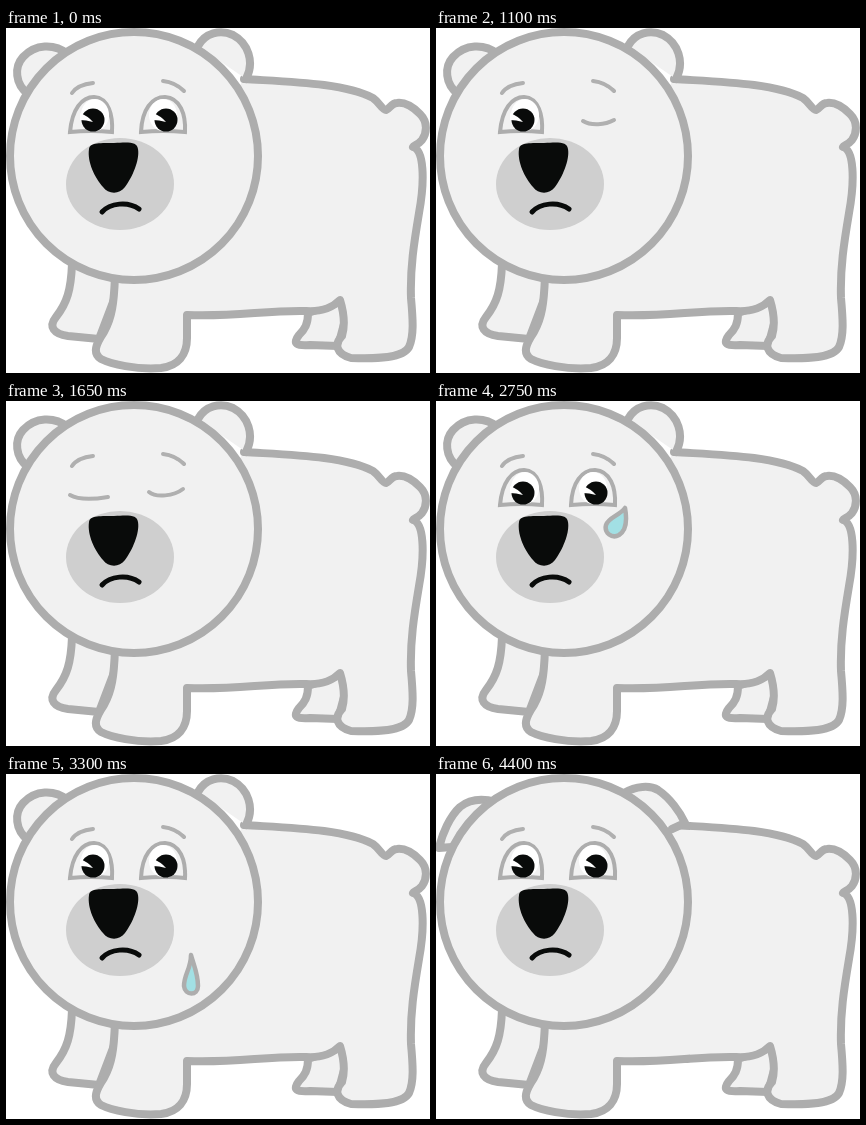
Recreate the animation shown at these times as an HTML page. Size 424 px wide and 345 px high, loop 4.95 s.

```html
<!DOCTYPE html>
<html lang="en">
<head>
<meta charset="utf-8">
<title>Sad polar bear</title>
<style>
  html, body { margin: 0; width: 100%; height: 100%; overflow: hidden; background: #fff; }
  svg { display: block; width: 424px; height: 345px; }
  .fur { fill: #f1f1f1; stroke: #adadad; stroke-width: 8; stroke-linejoin: round; stroke-linecap: round; }
  .line { fill: none; stroke: #b0b0b0; stroke-width: 4; stroke-linecap: round; }
  .lid { fill: #f1f1f1; stroke: #adadad; stroke-width: 4; }
  .tear { fill: #a2e0e4; stroke: #adadad; stroke-width: 4.5; stroke-linejoin: round; }
  .ink { fill: #090b0a; }
  [data-steps] { visibility: hidden; }
</style>
</head>
<body>
<svg viewBox="0 0 424 345">
  <!-- far legs -->
  <path class="fur" d="M66 236C65 262 61 275 50 289C42 299 48 306 62 308C73 309 82 310 93 311L120 240Z"/>
  <path class="fur" d="M302 285C302 296 299 301 293 307C286 316 291 318 304 317L332 318L345 270Z"/>

  <!-- body, tail and near legs -->
  <path class="fur" d="M238 51C285 54 338 55 367 70C374 75 376 82 380 82C384 81 385 75 391 75
    C399 74 407 79 414 86C422 94 421 105 416 112C412 117 408 117 407 119C418 122 419 152 413 185
    C408 215 404 240 405 270C407 292 408 308 403 319C397 330 372 331 345 330C330 326 328 316 336 308
    C339 298 338 285 334 272C327 279 318 284 300 283C260 282 230 289 181 287L181 310
    C181 327 172 338 155 340C130 342 105 336 95 331C86 325 90 316 98 304C106 290 108 275 109 248"/>

  <!-- ears -->
  <g class="fur" data-steps="0 1 2 3 4 5 6 7">
    <path d="M22 66C9 56 8 39 17 29C29 16 48 15 62 26"/>
    <path d="M192 18C199 5 214 1 227 7C242 15 249 34 240 51"/>
  </g>
  <g class="fur" data-steps="8">
    <path d="M16 73L3 74C6 60 14 42 24 33C34 25 46 24 60 28"/>
    <path d="M188 19C200 12 214 11 222 16C234 24 244 38 249 49L236 55"/>
  </g>

  <circle class="fur" cx="128" cy="128" r="124"/>

  <!-- brows -->
  <path class="line" d="M66 65C70 59 78 56 87 55M157 53C166 54 172 57 178 63"/>

  <!-- open eyes -->
  <g data-steps="0 2 4 5 6 7 8">
    <path class="lid" d="M64 104C66 81 76 69 88 69C103 70 107 88 106 104Q85 102 64 104Z"/>
    <ellipse cx="89" cy="87" rx="14" ry="16" fill="#fff"/>
    <ellipse class="ink" cx="87" cy="92" rx="11.5" ry="11.5"/>
    <path d="M74 85Q82 88 87 94Q80 92 74 92Z" fill="#fff"/>
  </g>
  <g data-steps="0 1 4 5 6 7 8">
    <path class="lid" d="M135 104C136 81 146 69 159 69C174 70 180 86 179 104Q157 102 135 104Z"/>
    <ellipse cx="157" cy="87" rx="14" ry="16" fill="#fff"/>
    <ellipse class="ink" cx="160" cy="92" rx="11.5" ry="11.5"/>
    <path d="M147 85Q155 88 160 94Q153 92 147 92Z" fill="#fff"/>
  </g>

  <!-- closed eyes -->
  <path class="line" data-steps="1 3" d="M64 94C74 100 90 98 102 96"/>
  <path class="line" data-steps="2" d="M147 93C155 98 169 97 178 92"/>
  <path class="line" data-steps="3" d="M143 91C150 97 168 95 177 88"/>

  <!-- muzzle -->
  <ellipse cx="114" cy="156" rx="54" ry="46" fill="#cfcfcf"/>
  <path class="ink" d="M83 121C84 115 91 115 108 115C124 114 131 114 132 121C134 132 126 150 119 159C113 167 102 166 97 159C89 150 81 134 83 121Z"/>
  <path d="M96 184C104 175 122 173 133 181" fill="none" stroke="#090b0a" stroke-width="5" stroke-linecap="round"/>

  <!-- tear: welling, rolling, falling, landed -->
  <path class="tear" data-steps="4" d="M177 103C184 102 190 106 190 109C186 116 176 118 170 117C164 115 166 110 170 108C174 106 174 104 177 103Z"/>
  <path class="tear" data-steps="5" d="M189 107C191 118 191 129 183 134C176 138 168 132 170 124C173 116 183 115 189 107Z"/>
  <path class="tear" data-steps="6" d="M185 181C185 195 178 200 178 212C179 222 192 222 192 212C192 200 188 192 185 181Z"/>
  <ellipse class="tear" data-steps="7" cx="187" cy="334" rx="18" ry="9"/>
</svg>
<script>
  const STEP_MS = 550, STEP_COUNT = 9;
  const parts = [...document.querySelectorAll('[data-steps]')].map(node => ({
    node, steps: node.dataset.steps.split(' ').map(Number)
  }));
  const start = performance.now();

  function draw(now) {
    const step = Math.floor(Math.max(0, now - start) / STEP_MS) % STEP_COUNT;
    for (const { node, steps } of parts) {
      node.style.visibility = steps.includes(step) ? 'visible' : 'hidden';
    }
    requestAnimationFrame(draw);
  }
  draw(start);
</script>
</body>
</html>
```
